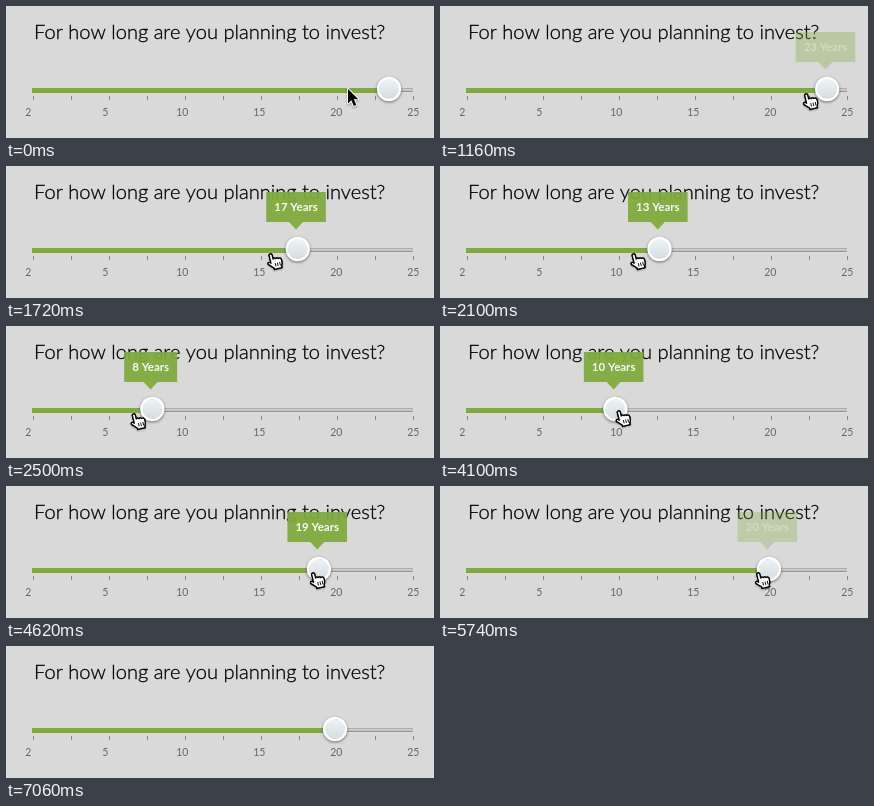
These frames come from a looping animation (428 by 132 pixels, 8000 ms). An HTML page with a canvas:

```html
<!DOCTYPE html>
<html lang="en">
<head>
<meta charset="utf-8">
<title>Investment slider</title>
<style>
html, body { margin: 0; width: 100%; height: 100%; overflow: hidden; background: #d9d9d9; }
canvas { display: block; }
</style>
</head>
<body>
<canvas id="stage" width="428" height="132"></canvas>
<script>
const ctx = document.getElementById('stage').getContext('2d');
const LOOP = 8000, LEFT = 26, RIGHT = 407, GREEN = '#80ab3c';
const FONT = 'Lato, "Open Sans", sans-serif', TIP_FONT = 'bold 11.5px ' + FONT;

const hand = new Path2D('M-1.5 9V1.8Q-1.5 .5 0 .5T1.5 1.8V6Q3 5 4.2 6.3Q5.8 5.3 6.8 6.9' +
  'Q9 6.3 9.4 8.3V11Q9.3 13 8 14.6V16.5H.2V15L-4.3 10.4Q-5 8.8-3.8 8.3Q-2.6 8.1-1.5 9.6Z');
const arrow = new Path2D('M0 0V14.5L3.3 11.3L5.8 17L8.4 15.9L5.9 10.3H10.3Z');

// Constant speed with a soft start and stop, each taking the share `ramp`
function glide(u, ramp) {
  const speed = 1 / (1 - ramp);
  if (u < ramp) return speed * u * u / (2 * ramp);
  if (u > 1 - ramp) return 1 - speed * (1 - u) ** 2 / (2 * ramp);
  return speed * (u - ramp / 2);
}

const progress = (t, start, end) => Math.min(1, Math.max(0, (t - start) / (end - start)));
const swing = (t, start, end) => 0.5 - Math.cos(progress(t, start, end) * Math.PI) / 2;

// Each move is [start, end, destination, ramp]
function follow(t, from, ...moves) {
  return moves.reduce((pos, [start, end, to, ramp = 0.2]) =>
    pos + (to - pos) * glide(progress(t, start, end), ramp), from);
}

const knobX = t => follow(t, 383, [930, 1015, 393], [1015, 2745, 130],
  [3400, 3540, 133], [3850, 4770, 329]);
const cursorX = t => follow(t, 342, [20, 140, 326], [300, 520, 384], [915, 2670, 122],
  [3400, 3540, 127], [3850, 4700, 320, 0.08], [6570, 6680, 398]);
const cursorY = t => follow(t, 83, [300, 520, 87], [3850, 4100, 84],
  [4100, 4620, 86], [6570, 6680, 92]);

function rect(color, x, y, w, h) {
  ctx.fillStyle = color;
  ctx.fillRect(x, y, w, h);
}

function disc(fill, x, y, radius) {
  ctx.fillStyle = fill;
  ctx.beginPath();
  ctx.arc(x, y, radius, 0, 7);
  ctx.fill();
}

function text(string, x, y, font, color, align = 'center') {
  ctx.font = font;
  ctx.fillStyle = color;
  ctx.textAlign = align;
  ctx.fillText(string, x, y);
}

function shadow(color, blur, y) {
  ctx.shadowColor = color;
  ctx.shadowBlur = blur;
  ctx.shadowOffsetY = y;
}

function drawHeading() {
  const title = 'For how long are you planning to invest?';
  text(title, 28, 33, '300 20.1px ' + FONT, '#000', 'left');
  ctx.strokeStyle = '#000';
  ctx.lineWidth = 0.3;
  ctx.strokeText(title, 28, 33);
}

function drawTrack(x) {
  ['#b0b0b0', '#cacaca', '#c4c4c4', '#949494', '#dedede']
    .forEach((color, row) => rect(color, LEFT, 82 + row, RIGHT - LEFT, 1));
  rect(GREEN, LEFT, 82, x - LEFT, 5);
  for (let i = 0; i <= 10; i++) rect('#858585', Math.round(26.6 + i * 38.05), 90, 1, 4);
  [2, 5, 10, 15, 20, 25].forEach((n, i) => text(n, 22.3 + i * 77, 110, '10.5px ' + FONT, '#666'));
}

function drawKnob(x) {
  ctx.save();
  shadow('rgba(0,0,0,.5)', 3, 1);
  disc('#fff', x, 83, 12.2);
  ctx.restore();
  const shade = ctx.createLinearGradient(0, 73, 0, 93);
  shade.addColorStop(0, '#f0f4f5');
  shade.addColorStop(1, '#d3dde1');
  disc(shade, x, 83, 10);
}

function drawTooltip(x, opacity) {
  const label = Math.floor((x - 39) / 16 + 2) + ' Years';
  const center = x - 1.7;
  ctx.save();
  ctx.globalAlpha = opacity * 0.94;
  ctx.font = TIP_FONT;
  const half = ctx.measureText(label).width / 2 + 8;
  rect(GREEN, center - half, 26, half * 2, 30);
  ctx.beginPath();
  ctx.moveTo(center - 7, 56);
  ctx.lineTo(center + 7, 56);
  ctx.lineTo(center, 63.5);
  ctx.fill();
  text(label, center, 45, TIP_FONT, '#fff');
  ctx.restore();
}

function drawCursor(t) {
  if (t >= 6680) return;
  const pointing = t > 450 && t < 6610;
  const shape = pointing ? hand : arrow;
  ctx.save();
  ctx.translate(cursorX(t), cursorY(t));
  if (pointing) {
    ctx.translate(1, 9);
    ctx.rotate(-0.25);
    ctx.translate(-1, -9);
  }
  ctx.lineJoin = 'round';
  ctx.lineWidth = pointing ? 1.3 : 2;
  ctx.strokeStyle = pointing ? '#000' : '#fff';
  ctx.fillStyle = pointing ? '#fff' : '#000';
  shadow('rgba(0,0,0,.35)', 2, 1);
  ctx.stroke(shape);
  shadow('transparent', 0, 0);
  ctx.fill(shape);
  if (pointing) {
    ctx.stroke(shape);
    for (let i = 0; i < 3; i++) rect('#000', 2 + i * 2.3, 10.5, 0.9, 3.5);
  }
  ctx.restore();
}

function draw() {
  const t = performance.now() % LOOP;
  const x = knobX(t);
  rect('#d9d9d9', 0, 0, 428, 132);
  drawHeading();
  drawTrack(x);
  drawKnob(x);
  drawTooltip(x, swing(t, 950, 1450) - swing(t, 5430, 5940));
  drawCursor(t);
  requestAnimationFrame(draw);
}
draw();
</script>
</body>
</html>
```
